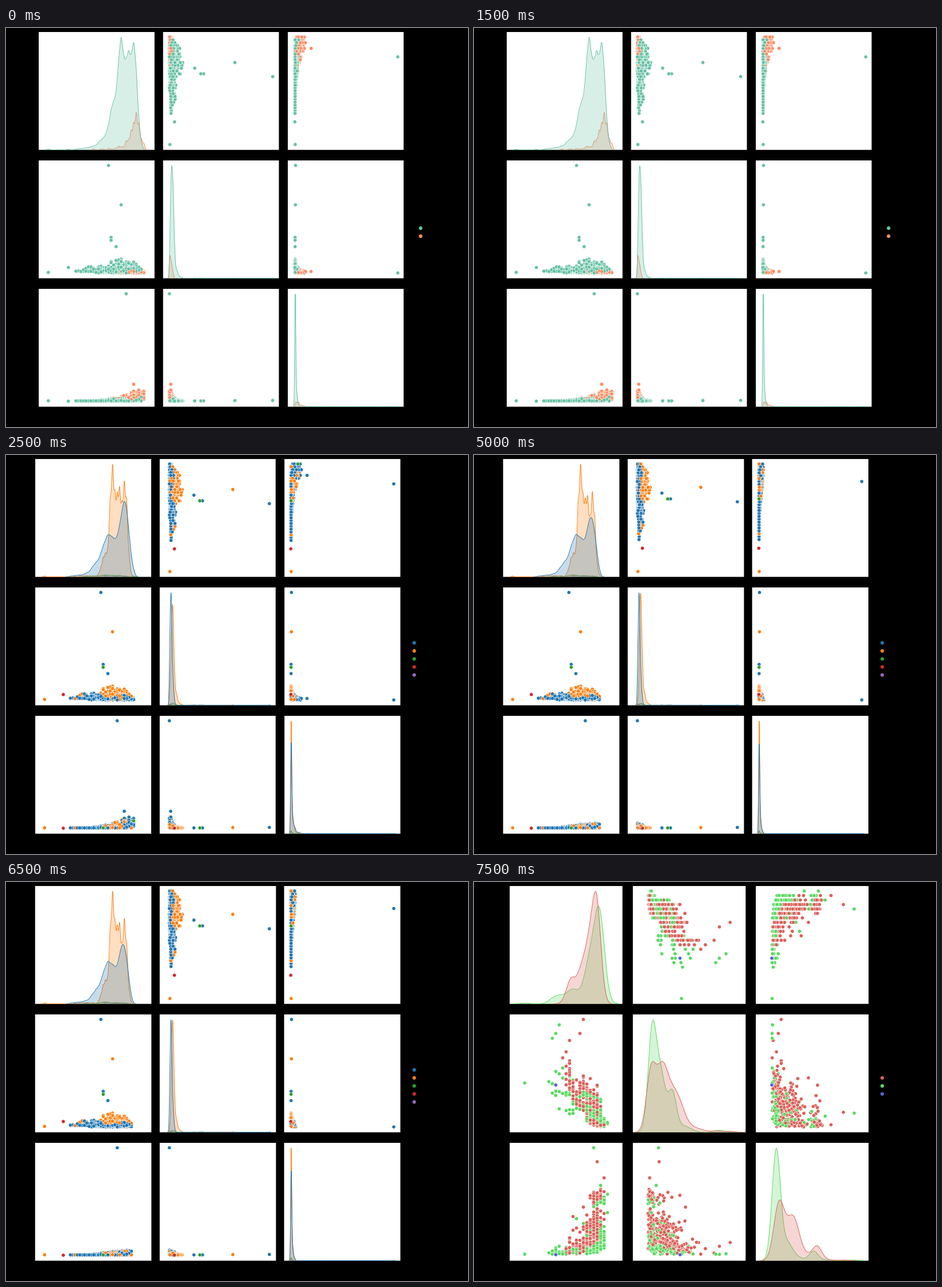
Write a matplotlib script that moves like this. It is 805 px wide and 696 px high and loops after 10 s.

```python
import matplotlib.pyplot as plt
import numpy as np
from matplotlib.animation import ArtistAnimation
from matplotlib.patches import Rectangle

W, H, DPI = 805, 696, 64
PT = 72 / DPI  # points per pixel
TOPS, PANEL_H, PEAK_H = (7, 231, 455), 205.6, 196
Y0, DY = (203.2, 427.2, 651), 187.4
DOT = (6.3 * PT) ** 2

SET2 = ["#66c2a5", "#fc8d62"]
TAB = ["#1f77b4", "#ff7f0e", "#2ca02c", "#d62728", "#9467bd"]
HLS = ["#db5f57", "#57db5f", "#575fdb"]


def mixture(rng, score, parts):
    """Evenly spaced quantiles of (weight, mean, sigma) parts, in the order of score."""
    weight, mean, sigma = np.array(parts).T
    n, fine = len(score), 60
    part = rng.choice(len(parts), n * fine, p=weight / weight.sum())
    values = np.empty(n)
    values[np.argsort(score)] = np.sort(rng.normal(mean[part], sigma[part]))[fine // 2::fine]
    return values


def linked(rng, score, rho):
    """A normal score with correlation rho to another one."""
    return rho * score + np.sqrt(1 - rho ** 2) * rng.normal(size=len(score))


def skewed_data(rng):
    """Columns: step, second, third, group, kind."""
    def cloud(n, kind, k_parts, v_parts):
        k = np.clip(np.rint(mixture(rng, rng.normal(size=n), k_parts)), 11, 38)
        v = np.abs(mixture(rng, rng.normal(size=n), v_parts))
        ceiling = .03 + .16 * np.clip(1 - ((k - 26) / 11.5) ** 2, 0, 1)
        v = ceiling * (1 - np.exp(-v / ceiling))
        rise = np.clip((k - 27) / 10, 0, 1)
        group = (rng.random(n) < .03 + .5 * rise ** 3) | (k == 38)
        growth = np.clip((k - 18) / 14, 0, 1)
        w = .003 + .045 * growth * rng.random(n) ** 6 * np.clip(1 - v / .13, 0, 1)
        w_side = .003 + (.03 + .09 * rise) * rng.beta(1, 2, n)
        v_side = .045 * rng.random(n) ** 1.5 * (1 - w_side / .17)
        return np.column_stack([k, np.where(group, v_side, v), np.where(group, w_side, w),
                                group, np.full(n, kind)])

    blue_k = [(.44, 34.3, 1.6), (.23, 30.1, 2.1), (.18, 26.7, 1.8), (.13, 23, 2.6), (.02, 16, 3)]
    orange_k = [(.27, 28.7, .8), (.07, 30, .7), (.28, 31.7, 1), (.29, 34.4, .9), (.09, 25.7, 1.2), (.01, 18, 3)]
    blue_v = [(.78, .016, .009), (.2, .037, .012), (.02, .06, .03)]
    orange_v = [(.66, .033, .011), (.17, .055, .01), (.13, .08, .025), (.04, .14, .05)]
    points = np.vstack([
        cloud(800, 0, blue_k, blue_v),
        cloud(900, 1, orange_k, orange_v),
        cloud(20, 2, [(1, 28, 5)], [(1, .03, .02)]),
        cloud(4, 4, [(1, 30, 3)], [(1, .01, .01)]),
    ])
    outliers = [
        (24, 1, .007, 0, 0), (29, .634, .006, 0, 1), (31, 0, 1, 0, 0),
        (25, .331, .003, 0, 0), (25, .304, .003, 0, 2), (27, .245, .003, 0, 0),
        (0, .005, .004, 0, 1), (8, .05, 0, 0, 3), (34, .013, .158, 1, 0),
    ]
    return np.vstack([rng.permutation(points), outliers])


def broad_data(rng):
    """Columns: step, second, third, kind."""
    def cloud(n, kind, k_parts, v_parts, w_parts):
        score = rng.normal(size=n)
        k = np.clip(np.rint(mixture(rng, score, k_parts)), 7, 24)
        v = mixture(rng, linked(rng, score, -.82), v_parts)
        w = mixture(rng, linked(rng, score, .65), w_parts)
        return np.column_stack([k, np.abs(v), np.maximum(w, .01), np.full(n, kind)])

    red = cloud(260, 0, [(.48, 20.8, .85), (.26, 18.6, .9), (.13, 16.3, .9), (.13, 13.4, 1)],
                [(.28, .035, .025), (.36, .17, .05), (.33, .33, .08), (.03, .58, .08)],
                [(.42, .09, .035), (.09, .18, .03), (.34, .27, .045), (.04, .4, .04), (.11, .55, .03)])
    green = cloud(240, 1, [(.57, 21.6, .8), (.26, 18.8, .9), (.12, 14, 1.5), (.05, 9.5, 1.5)],
                  [(.47, .05, .022), (.26, .147, .03), (.06, .22, .03), (.17, .3, .02), (.04, .45, .06)],
                  [(.77, .06, .022), (.12, .19, .03), (.04, .28, .04), (.07, .51, .03)])
    outliers = [
        (17, 1, .118, 0), (16, .87, .083, 0), (13, .805, .02, 0), (21, .136, .87, 0), (23, .02, .72, 0),
        (0, .408, .01, 1), (10, .95, .014, 1), (9, .87, .008, 1), (8, .825, .01, 1),
        (20, .128, 1, 1), (22, .1, .65, 1), (24, .04, .396, 1), (9, .39, .005, 2),
    ]
    return np.vstack([rng.permutation(np.vstack([red, green])), outliers])


fig = plt.figure(figsize=(W / DPI, H / DPI), dpi=DPI, facecolor="black")
ax = fig.add_axes([0, 0, 1, 1])
ax.set(xlim=(0, W), ylim=(H, 0))
ax.axis("off")


def density(x, smoothing):
    """Grid and summed Gaussian kernels, cut three bandwidths past the data."""
    width = max(smoothing * x.std(), .85)
    grid = np.linspace(x.min() - 3 * width, x.max() + 3 * width, 1200)
    return grid, np.exp(-.5 * ((grid[:, None] - x) / width) ** 2).sum(axis=1) / width


def draw_densities(x, kinds, palette, smoothing, base, clip):
    curves = {kind: density(x[kinds == kind], smoothing)
              for kind in reversed(range(len(palette))) if (kinds == kind).sum() > 1}
    scale = PEAK_H / max(height.max() for _, height in curves.values())
    artists = []
    for kind, (grid, height) in curves.items():
        y = base - scale * height
        artists.append(ax.fill_between(grid, y, base, color=palette[kind], alpha=.25, lw=0, zorder=2))
        artists += ax.plot(grid, y, color=palette[kind], lw=.95 * PT, zorder=2)
    for artist in artists:
        artist.set_clip_path(clip)
    return artists


def scene(lefts, width, x0, dx, values, kinds, palette, smoothing, legend):
    """Artists of one 3 x 3 pair plot."""
    kinds = kinds.astype(int)
    colors = np.array(palette)[kinds]
    values = values[:, :3] / [values[:, 0].max(), 1, 1]
    xs = np.array(x0) + np.array(dx) * values
    ys = np.array(Y0) - DY * values
    artists = []
    for row, top in enumerate(TOPS):
        for col, left in enumerate(lefts):
            panel = ax.add_patch(Rectangle((left, top), width, PANEL_H, fc="white", lw=0,
                                           snap=False, zorder=1))
            artists.append(panel)
            if row == col:
                artists += draw_densities(xs[:, col], kinds, palette, smoothing,
                                          top + PANEL_H - .2, panel)
            else:
                dots = ax.scatter(xs[:, col], ys[:, row], s=DOT, c=colors, edgecolors="white",
                                  linewidths=.6 * PT, zorder=2)
                dots.set_clip_path(panel)
                artists.append(dots)
    x, y = legend
    artists.append(ax.scatter([x] * len(palette), y + 14 * np.arange(len(palette)),
                              s=DOT, c=palette, linewidths=0, zorder=2))
    return artists


skewed = skewed_data(np.random.default_rng(4))
main = skewed[skewed[:, 3] == 0]
broad = broad_data(np.random.default_rng(9))

scenes = [
    scene((57, 273.7, 491), 201.8, (73.7, 284.7, 503.2), (166.3, 180, 179.5),
          skewed, skewed[:, 3], SET2, .13, (722.4, 349.2)),
    scene((51, 267.8, 485.2), 202, (67.2, 284.7, 496.2), (155.2, 174.2, 179.5),
          skewed, skewed[:, 4], TAB, .13, (711.3, 327.7)),
    scene((50.7, 267.8, 484.6), 202.6, (67.2, 284.7, 496.2), (151.2, 174.2, 179.5),
          main, main[:, 4], TAB, .13, (711.3, 327.7)),
    scene((62.2, 276.8, 491), 196.5, (88.3, 303.2, 518.2), (144.4, 143, 144.2),
          broad, broad[:, 3], HLS, .32, (711.3, 341.7)),
]

anim = ArtistAnimation(fig, scenes, interval=2500, repeat=True, repeat_delay=0, blit=False)
plt.show()
```
